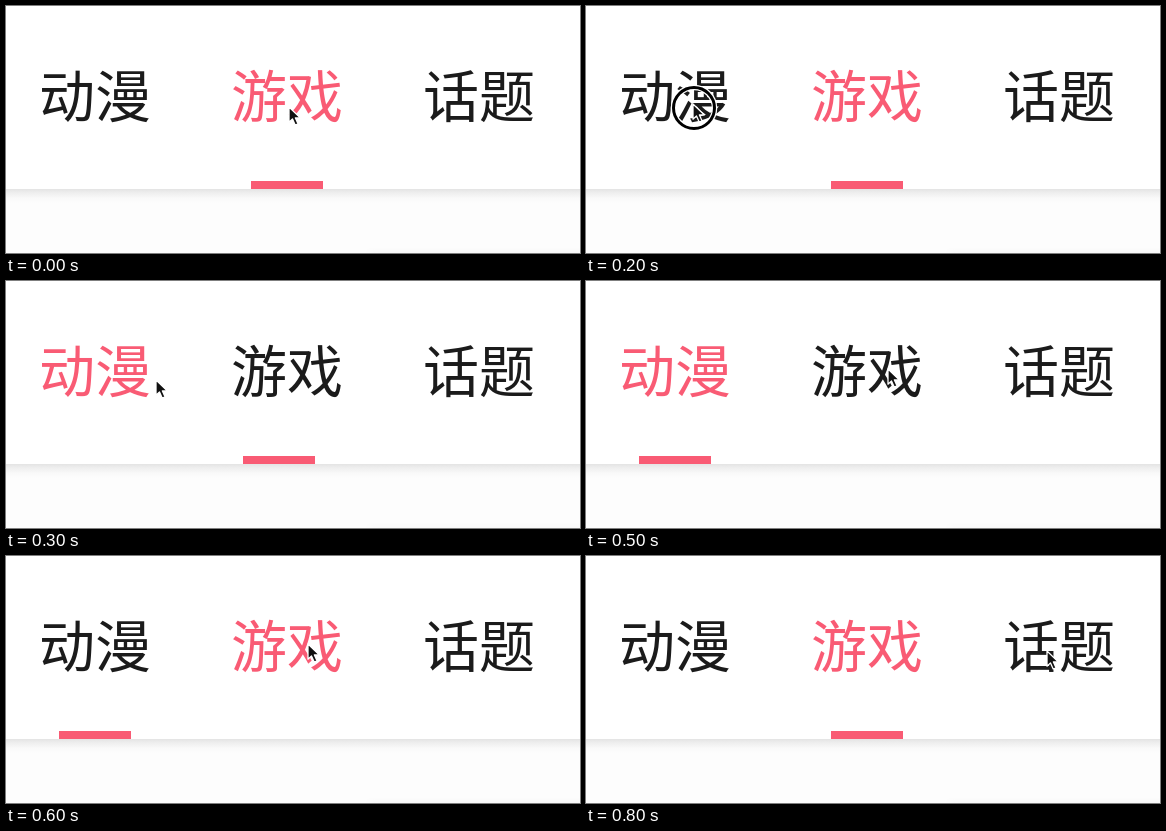
Animation of 574x247 px, one loop 0.9 s. Source, as an HTML page:

```html
<!DOCTYPE html>
<html lang="zh-CN">
<head>
<meta charset="utf-8">
<style>
  html, body { margin: 0; width: 100%; height: 100%; overflow: hidden; background: #fff; }
  svg { display: block; }
  text {
    font: 400 56px "Noto Sans CJK SC", "Noto Sans CJK", sans-serif;
    text-anchor: middle;
  }
</style>
</head>
<body>
<svg width="574" height="247" viewBox="0 0 574 247">
  <defs>
    <linearGradient id="shade" x2="0" y2="1">
      <stop stop-color="#e4e4e4"/>
      <stop offset=".3" stop-color="#efefef"/>
      <stop offset=".65" stop-color="#f9f9f9"/>
      <stop offset="1" stop-color="#fdfdfd"/>
    </linearGradient>
    <filter id="soft"><feGaussianBlur stdDeviation="3"/></filter>
  </defs>
  <rect width="574" height="247" fill="#fff"/>
  <rect y="183" width="574" height="64" fill="#fdfdfd"/>
  <rect y="183" width="574" height="14" fill="url(#shade)"/>
  <rect x="364" y="245" width="230" height="30" fill="#f8f8f8" filter="url(#soft)"/>

  <text x="89" y="111">动漫</text>
  <text x="281" y="111">游戏</text>
  <text x="473" y="111">话题</text>
  <rect id="bar" y="175" width="72" height="8" fill="#f95b74"/>

  <g id="ring" fill="none">
    <circle cx="108" cy="102" r="20.5" stroke="#fff" stroke-width="5.5"/>
    <circle cx="108" cy="102" r="20.5" stroke="#000" stroke-width="3"/>
  </g>
  <path id="cursor" d="M0 0V15.2L3.5 11.9L6.2 18L9 16.8L6.4 10.9H11.2Z"
        fill="#111" stroke="#fff" stroke-width="1.3" stroke-linejoin="round"/>
</svg>
<script>
  const LOOP = 900, STEP = 100;
  const PINK = '#f95b74', INK = '#1b1b1b';
  const labels = document.querySelectorAll('text');
  const [bar, ring, cursor] = ['bar', 'ring', 'cursor'].map(id => document.getElementById(id));

  // Pointer stops: time, x, y
  const stops = [
    [0, 283, 101], [200, 107, 98], [300, 150, 99],
    [500, 302, 88], [600, 302, 88], [800, 461, 95]
  ];

  const progress = (t, from, to) => Math.min(1, Math.max(0, (t - from) / (to - from)));
  const mix = (a, b, k) => a + (b - a) * k;
  const easeOut = k => 1 - (1 - k) ** 2;

  function pointerAt(t) {
    const i = Math.max(1, stops.findIndex(stop => stop[0] >= t));
    const [t0, x0, y0] = stops[i - 1], [t1, x1, y1] = stops[i];
    const k = progress(t, t0, t1);
    return [mix(x0, x1, k), mix(y0, y1, k)];
  }

  function barAt(t) {
    if (t < 600) return t < 300 ? 245 : mix(237, 53, easeOut(progress(t, 300, 460)));
    return mix(53, 245, easeOut(progress(t, 600, 800)));
  }

  function activeAt(t) {
    if (t === 500) return 0;
    return t >= 300 && t < 600 ? 0 : 1;
  }

  function draw(now) {
    const t = Math.floor(now % LOOP / STEP) * STEP;
    const active = activeAt(t);
    labels.forEach((label, i) => label.setAttribute('fill', i === active ? PINK : INK));
    bar.setAttribute('x', barAt(t));
    ring.setAttribute('visibility', t === 200 ? 'visible' : 'hidden');
    cursor.setAttribute('transform', `translate(${pointerAt(t)})`);
  }

  const start = performance.now();
  function tick() {
    draw(performance.now() - start);
    requestAnimationFrame(tick);
  }
  tick();
</script>
</body>
</html>
```
